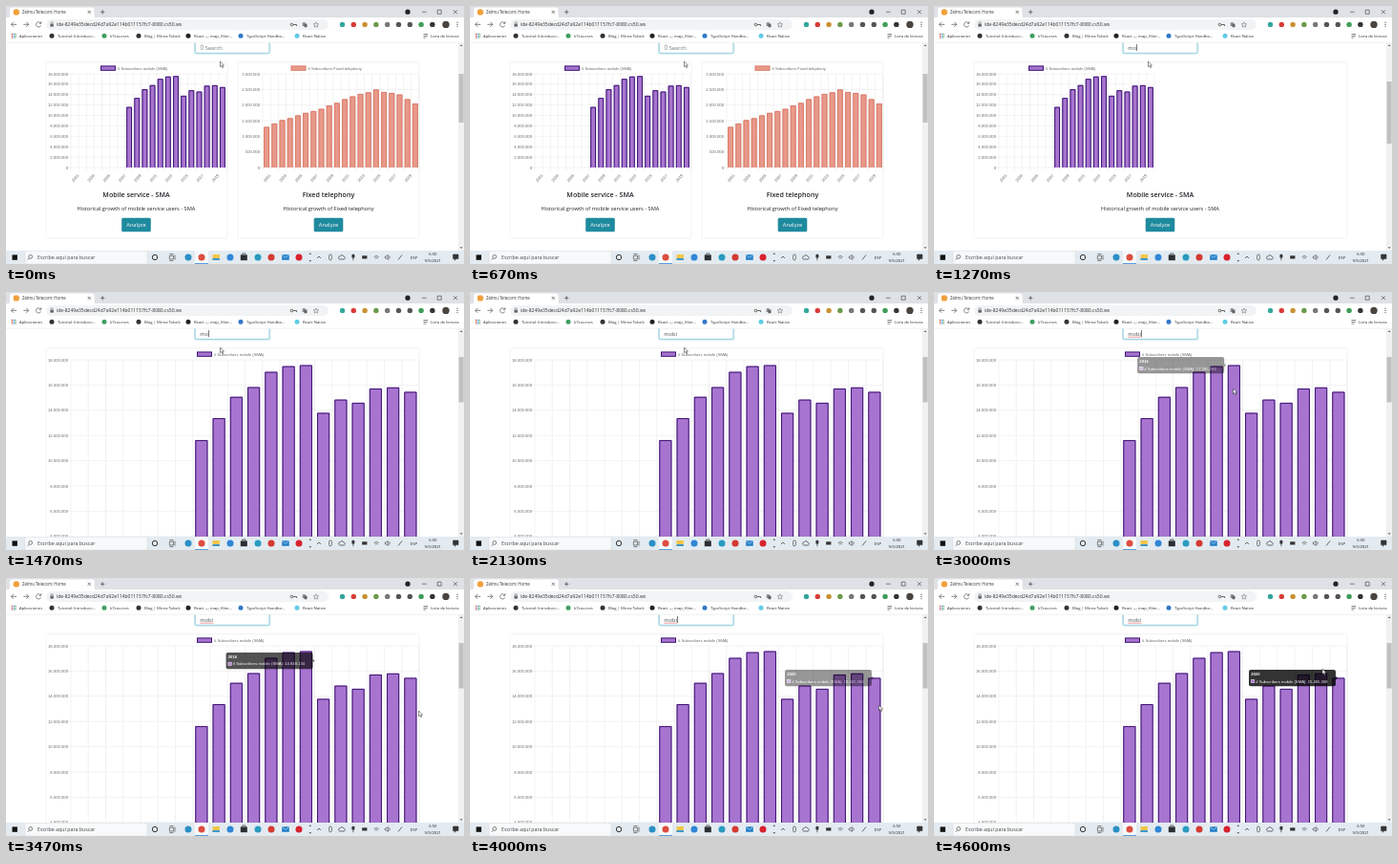
Write an HTML page that moves like this. It is 480x270 px and loops after 4670 ms.

```html
<!DOCTYPE html>
<html lang="es">
<head>
<meta charset="utf-8">
<title>Subscribers dashboard</title>
<style>
  html, body { margin: 0; width: 100%; height: 100%; overflow: hidden; background: #fff; }
  svg { display: block; width: 100vw; height: 100vh; }
  text { font-family: "Open Sans", "Noto Sans", sans-serif; white-space: pre; }
  .plot text, #tip text { font-family: "Liberation Sans", Arial, sans-serif; font-size: 4.2px; }
  .plot text { fill: #666; }
</style>
</head>
<body>
<svg id="stage" viewBox="0 0 480 270"></svg>
<script>
const LOOP = 4670;
const PURPLE = { fill: '#a774cf', line: '#3b1270' };
const CORAL = { fill: '#e9998a', line: '#d97d6c' };
const mobile = [11.64, 13.38, 15.07, 15.84, 17.05, 17.5, 17.58, 13.8, 14.85, 14.6, 15.73, 15.82, 15.465];
const fixed = [1.3, 1.41, 1.52, 1.58, 1.67, 1.75, 1.81, 1.88, 1.99, 2.07,
  2.19, 2.28, 2.36, 2.41, 2.5, 2.42, 2.39, 2.34, 2.19, 2.05];

const rect = (x, y, w, h, fill, more = '') =>
  `<rect x="${x}" y="${y}" width="${w}" height="${h}" fill="${fill}" ${more}/>`;
const dot = (x, y, r, fill, more = '') => `<circle cx="${x}" cy="${y}" r="${r}" fill="${fill}" ${more}/>`;
const path = (d, stroke = '#5f6368', width = .8, fill = 'none') =>
  `<path d="${d}" fill="${fill}" stroke="${stroke}" stroke-width="${width}"/>`;
const text = (x, y, s, size, fill = '#333', more = '') =>
  `<text x="${x}" y="${y}" font-size="${size}" fill="${fill}" ${more}>${s}</text>`;
const MID = 'text-anchor="middle"', END = 'text-anchor="end"';
const group = (id, body) => `<g id="${id}">${body}</g>`;

const thousands = n => String(n).replace(/\B(?=(\d{3})+$)/g, '.');

// Bar chart for the years 2001 to 2020; values in millions.
function chart({ x, w, h, max, step, data, color, label, legendX }) {
  const top = 71, base = top + h, cat = w / 20, bar = cat * .72;
  const first = 20 - data.length;
  let grid = '', out = '';
  for (let v = 0; v <= max; v += step) {
    const y = base - v / max * h;
    grid += `M${x - 3.5} ${y}H${x + w}`;
    out += `<text x="${x - 3}" y="${y + 1.5}" ${END}>${thousands(Math.round(v * 1e6))}</text>`;
  }
  for (let i = 0; i <= 20; i++) {
    grid += `M${x + i * cat} ${top}V${base + 3.5}`;
    if (i % 2 == 0 && i < 20) {
      const cx = x + (i + .5) * cat;
      out += `<text transform="translate(${cx + .6} ${base + 11}) rotate(-50)" y="1.5" ${MID}>${2001 + i}</text>`;
    }
  }
  data.forEach((v, i) => {
    const left = x + (first + i + .5) * cat - bar / 2, y = base - v / max * h;
    out += rect(left, y, bar, base - y, color.fill) +
      path(`M${left + .5} ${base}V${y + .5}H${left + bar - .5}V${base}`, color.line, 1);
  });
  out += rect(legendX + .5, 62.9, 15, 4.4, color.fill, `stroke="${color.line}" stroke-width="1"`) +
    `<text x="${legendX + 18}" y="66.7">${label}</text>`;
  return `<g class="plot">${path(grid, '#e6e6e6', .5)}${out}</g>`;
}

const card = (x, w, h) => rect(x, 58.7, w, h, '#fff', 'rx="1.5" stroke="#e4e4e4" stroke-width=".5"');
const caption = (x, title, about) =>
  text(x, 200.4, title, 7.1, '#212529', MID + ' font-weight="600"') +
  text(x, 213.6, about, 5.7, '#212529', MID) +
  rect(x - 15.3, 221.7, 30.6, 14.6, '#1f8a9e', 'rx="1.5"') +
  text(x, 231, 'Analyze', 5.7, '#fff', MID);

const sma = ['Mobile service - SMA', 'Historical growth of mobile service users - SMA'];
const mobileChart = (w, h, legendX) => chart({ x: 68, w, h, legendX, max: 18, step: 2,
  data: mobile, color: PURPLE, label: '# Subscribers mobile (SMA)' });

function page() {
  const both = card(42, 190, 184.5) + card(243, 190, 184.5) + mobileChart(163, 98, 99) +
    caption(136.5, ...sma) +
    chart({ x: 269, w: 164, h: 98, max: 3, step: .5, data: fixed, color: CORAL,
      label: '# Subscribers Fixed telephony', legendX: 298.5 }) +
    caption(338, 'Fixed telephony', 'Historical growth of Fixed telephony');
  const wide = card(42, 391, 184.5) + mobileChart(163, 98, 99) + caption(237, ...sma);
  const full = card(42, 391, 300) + mobileChart(365, 237.6, 200);
  return rect(0, 38, 480, 232, '#fff') +
    group('both', both) + group('wide', wide) + group('full', full) +
    rect(197.6, 30, 79, 20, 'none', 'rx="2" stroke="#d3ecf3" stroke-width="1.6"') +
    rect(198.3, 30, 77.6, 19.3, '#fff', 'rx="1.5" stroke="#72bdd2" stroke-width=".7"') +
    group('hint', rect(204.2, 41, 2.2, 4.4, 'none', 'stroke="#7c848b" stroke-width=".5"') +
      text(208.8, 45.6, 'Search', 5.7, '#6c757d')) +
    text(203.3, 45.6, '', 5.7, '#495057', 'id="typed"') +
    group('spell', path('M203.3 47.2H217.3', '#e0605c', .6)) +
    rect(0, 40, .6, 7, '#222', 'id="caret"');
}

function browser() {
  const marks = [[54, 'Tutorial: Introducci...', '#333'], [109, 'k7courses', '#3f9f62'],
    [145, 'Blog | Mirna Talvek', '#333'], [197, 'React — map, filter...', '#222'],
    [252, 'TypeScript Handbo...', '#3178c6'], [311, 'React Native', '#5fcbe6']];
  const addons = ['#35a79c', '#d93c35', '#c9922f', '#6a9a4a', '#777', '#555', '#555', '#3f9d57', '#333'];
  let apps = '';
  for (let i = 0; i < 9; i++)
    apps += rect(5.8 + i % 3 * 1.8, 28.8 + Math.floor(i / 3) * 1.8, 1.2, 1.2, ['#d95045', '#4c8bf5', '#46a35b'][i % 3]);
  return rect(0, 0, 480, 12.5, '#dee1e6') + rect(0, 12, 480, 26.3, '#fff') +
    path('M2 12.5Q4 12.5 4 10V4Q4 1.5 6.5 1.5H90Q92.5 1.5 92.5 4V10Q92.5 12.5 94.5 12.5Z', 'none', 0, '#fff') +
    dot(10.8, 6.4, 3.2, '#f0a03c') + text(17, 8, 'Zelmu Telecom: Home', 4.4) +
    path('M85.8 4.8l3 3m0-3l-3 3M99 6.3h4.4M101.2 4.1v4.4', '#444', .7) +
    dot(421, 6.2, 2.6, '#222') +
    path('M436 6.2h4.6M452.2 4.2h4v4h-4zM469 4.2l4 4m0-4l-4 4', '#333', .6) +
    path('M11 19.3H5.5m2.5-2.5l-2.5 2.5l2.5 2.5M18.3 19.3h5.5m-2.5-2.5l2.5 2.5l-2.5 2.5') +
    path('M36.3 18a2.6 2.6 0 1 0 .2 2.4M36.8 16.3v2h-2') +
    rect(42, 14, 296, 11, '#f1f3f4', 'rx="5.5"') +
    rect(46.4, 18.8, 3.4, 2.8, '#5f6368') + path('M47 19v-1.2a1.1 1.1 0 0 1 2.2 0V19', '#5f6368', .6) +
    text(53, 21.2, 'ide-8249e35decd24d7a92e114b011157fc7-8080.cs50.ws', 5, '#303134') +
    dot(299.5, 19.5, 1.3, 'none', 'stroke="#555" stroke-width=".9"') + path('M301 19.5h3.5v1.5', '#555', .9) +
    rect(310.7, 17.2, 3.2, 3.8, '#8a8d91') + rect(312.5, 18.6, 3, 3.6, '#5f6368') +
    path('M325 16.8l.8 1.9 2 .1-1.6 1.3.6 2-1.8-1.1-1.8 1.1.6-2-1.6-1.3 2-.1z', '#5f6368', .5) +
    addons.map((c, i) => dot(352.5 + i * 11.8, 19.4, 2.7, c)).join('') +
    dot(461, 19.4, 3.7, '#4b4540') + [17.2, 19.4, 21.6].map(y => dot(473, y, .6, '#444')).join('') +
    apps + text(14, 32.7, 'Aplicaciones', 4.2) +
    marks.map(([x, s, c]) => dot(x - 6, 31.2, 2.5, c) + text(x, 32.7, s, 4.2)).join('') +
    path('M437.5 29.5h4.5m-4.5 1.8h4.5m-4.5 1.8h2.5', '#555', .7) + text(445, 32.7, 'Lista de lectura', 4.2) +
    path('M0 38.2H480', '#dfe1e4', .5) +
    rect(474, 38.4, 6, 218, '#f1f1f1') + rect(474.6, 0, 5, 10, '#c1c1c1', 'id="thumb"') +
    path('M475.6 42l1.5-1.7 1.5 1.7zM475.6 252.2l1.5 1.7 1.5-1.7z', 'none', 0, '#666');
}

function taskbar() {
  const ink = '#333';
  const apps = [[191, '#2b8fc4'], [205, '#dc4d3e'], [235, '#2f86d6'], [264, '#2a9bc0'], [278, '#d43a30'], [307, '#d8232e']];
  return rect(0, 256, 480, 14, '#e3ebf1') + rect(20, 256.2, 128, 13.8, '#f7f9fa', 'stroke="#d3d8dc" stroke-width=".4"') +
    rect(6.5, 260.4, 5.4, 5.4, '#111') +
    dot(25.7, 262.4, 1.9, 'none', `stroke="${ink}" stroke-width=".6"`) + path('M24.4 263.9l-1.7 1.9', ink, .6) +
    text(33, 265, 'Escribe aquí para buscar', 5.3, '#444') +
    dot(156, 263, 2.7, 'none', 'stroke="#222" stroke-width=".9"') +
    path('M171.4 261.2h4v3.8h-4zM177 260.5v5.2M171.4 259.6h4M171.4 266.6h4', '#333', .6) +
    rect(198, 256, 14, 14, '#f6f9fb') + rect(198, 269.2, 14, .8, '#2f86d6') +
    apps.map(([x, c]) => dot(x, 263, 3.5, c)).join('') +
    rect(216.5, 260, 7.4, 6, '#f3c64b') + rect(216.5, 264, 7.4, 2, '#3e97d1') +
    rect(245.8, 260.4, 7, 5.8, '#2b2f33') + path('M247.7 260.3v-1.3h3.2v1.3', '#2b2f33', .7) +
    rect(289.2, 260.2, 7.6, 5.6, '#2480c8') + path('M289.2 260.4l3.8 3 3.8-3', '#d6ebf8', .6) +
    path('M317.4 259.8l1.4-1.5 1.4 1.5zM317.4 266.2l1.4 1.5 1.4-1.5z', 'none', 0, '#444') +
    path('M326 264l2-2 2 2', ink, .7) +
    rect(338.6, 260, 2.8, 5.8, 'none', 'rx="1.3" stroke="#333" stroke-width=".6"') +
    path('M349.5 265h5a1.5 1.5 0 0 0-.4-2.8 2.2 2.2 0 0 0-4-.4 1.7 1.7 0 0 0-.6 3.2z', ink, .7) +
    rect(362.4, 259.8, 3, 4, ink, 'rx="1.3"') + path('M363.9 263.5v2.7', ink, .7) +
    rect(373.2, 261.3, 5.2, 3.2, ink) +
    path('M385.7 262.5a4 4 0 0 1 5 0M386.8 264a2.4 2.4 0 0 1 2.8 0', ink, .6) +
    path('M397.4 262h1.3l1.5-1.5v5l-1.5-1.5h-1.3zM401.6 261.4a2.4 2.4 0 0 1 0 3.2', ink, .6) +
    path('M411 265.5l4-5', ink, .7) +
    text(427.4, 264.7, 'ESP', 4.2, '#222', MID) + text(447.3, 261.3, '6:50', 4.2, '#222', MID) +
    text(447.3, 268.3, '9/5/2021', 4.2, '#222', MID) +
    path('M468.6 260h5.4v4.6h-2.2l-1.6 1.6v-1.6h-1.6z', ink, .6, ink);
}

const tooltip = rect(0, 0, 91, 17.2, '#000', 'rx="2" fill-opacity=".8"') +
  path('M91 6.8l1.9 1.8-1.9 1.8z', 'none', 0, 'rgba(0,0,0,.8)') +
  `<text id="year" x="2.2" y="6.3" fill="#fff" font-weight="bold"></text>` +
  rect(2.3, 10.2, 3.6, 3.6, PURPLE.fill, 'stroke="#fff" stroke-width=".4"') +
  `<text id="value" x="7.2" y="13.5" fill="#fff"></text>`;

document.getElementById('stage').innerHTML =
  page() + group('tip', tooltip) + browser() + taskbar() +
  group('mouse', path('M0 0V5.6L1.3 4.5 2.2 6.6 3.2 6.2 2.3 4.2H4Z', '#222', .5, '#fff'));

const $ = id => document.getElementById(id);
const show = (id, on) => $(id).setAttribute('display', on ? 'inline' : 'none');
const move = (id, x, y) => $(id).setAttribute('transform', `translate(${x} ${y})`);
const clamp = v => Math.max(0, Math.min(1, v));
const outQuart = k => 1 - (1 - clamp(k)) ** 4;
const mix = (a, b, k) => a + (b - a) * k;

const layouts = [
  { at: 0, id: 'both', thumb: [71, 51] },
  { at: 1265, id: 'wide', thumb: [79, 65] },
  { at: 1395, id: 'full', thumb: [68, 47.5] }];
const typing = [
  { at: 0, word: '', width: 0 },
  { at: 930, word: 'm', width: 5.3 },
  { at: 1130, word: 'mo', width: 8.8 },
  { at: 1800, word: 'mob', width: 12.2 },
  { at: 1930, word: 'mobi', width: 13.8 }];
const caretOn = [[930, 1600], [1800, 2100], [2930, 3400], [3930, 4400]];
const route = [[0, 224.5, 58], [2650, 224.5, 58], [2930, 313.5, 101], [3050, 313.5, 101], [3330, 389, 126],
  [3470, 432.5, 139], [3600, 432.5, 139], [3870, 428.5, 133], [4420, 428.5, 133], [4600, 407, 95]];
const tips = [
  { at: 2900, year: 2014, value: '17.585.392', from: [197, 68], to: [220.5, 68], alpha: t => (t - 2900) / 200 },
  { at: 3440, year: 2016, value: '14.848.134', from: [220.5, 68], to: [257, 104], alpha: t => 1 - (t - 3440) / 200 },
  { at: 3900, year: 2020, value: '15.465.368', from: [330, 96], to: [330, 96], alpha: t => (t - 3900) / 200 }];

const latest = (list, t) => list.filter(s => s.at <= t).pop();

function pointer(t) {
  const i = route.findIndex(p => p[0] > t);
  if (i < 0) return route[route.length - 1].slice(1);
  const a = route[i - 1], b = route[i], k = (t - a[0]) / (b[0] - a[0]);
  return [mix(a[1], b[1], k), mix(a[2], b[2], k)];
}

function draw(t) {
  const layout = latest(layouts, t);
  layouts.forEach(l => show(l.id, l === layout));
  $('thumb').setAttribute('y', layout.thumb[0]);
  $('thumb').setAttribute('height', layout.thumb[1]);

  const { word, width } = latest(typing, t);
  $('typed').textContent = word;
  $('caret').setAttribute('x', 203.4 + width);
  show('hint', !word);
  show('caret', caretOn.some(([a, b]) => t >= a && t < b));
  show('spell', t >= 2470);

  const tip = latest(tips, t);
  show('tip', tip);
  if (tip) {
    const k = outQuart((t - tip.at) / 400);
    move('tip', mix(tip.from[0], tip.to[0], k), mix(tip.from[1], tip.to[1], k));
    $('tip').setAttribute('opacity', clamp(tip.alpha(t)));
    $('year').textContent = tip.year;
    $('value').textContent = `# Subscribers mobile (SMA): ${tip.value}`;
  }
  move('mouse', ...pointer(t));
}

const start = performance.now();
function tick() {
  draw(Math.max(0, performance.now() - start) % LOOP);
  requestAnimationFrame(tick);
}
tick();
</script>
</body>
</html>
```
